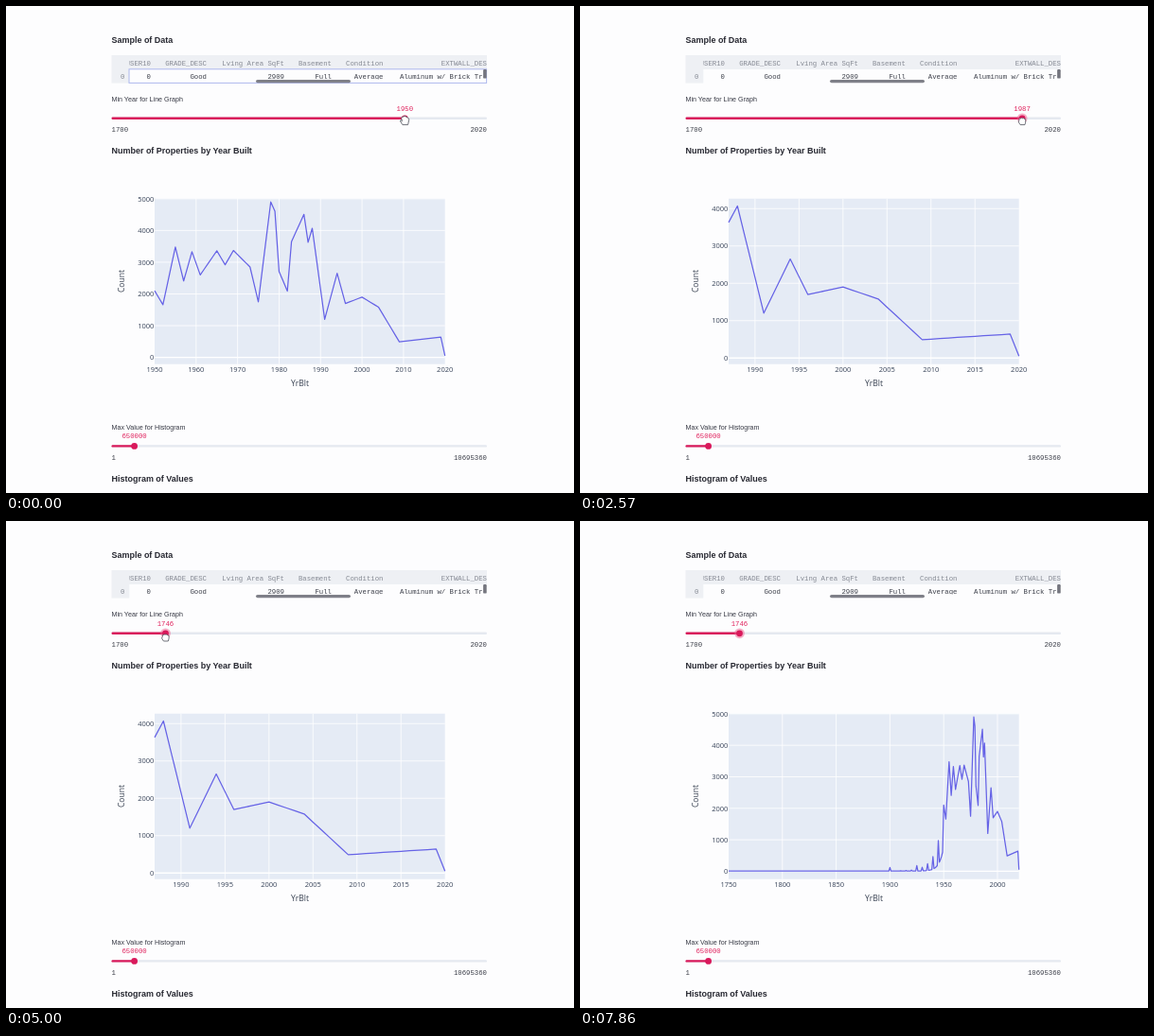
Write an HTML page that moves like this. It is 600x515 px and loops after 8 s.

```html
<!DOCTYPE html>
<html lang="en">
<head>
<meta charset="utf-8">
<title>Property data dashboard</title>
<style>
  html, body { margin: 0; width: 100%; height: 100%; overflow: hidden; background: #fdfdfe; }
  svg { display: block; width: 100%; height: 100%; }
  .head { font: bold 8.97px "Liberation Sans", Arial, sans-serif; fill: #262730; }
  .label { font: 7.15px "Liberation Sans", Arial, sans-serif; fill: #363843; }
  .mono { font: 7.3px "Liberation Mono", "Courier New", monospace; fill: #3c3f49; white-space: pre; }
  .dim { fill: #858993; }
  .value { fill: #e0245e; }
  .tick { font: 7.5px "Open Sans", "DejaVu Sans", sans-serif; fill: #364257; }
  .axis { font: 8.6px "Open Sans", "DejaVu Sans", sans-serif; fill: #3d4656; }
  .grid { stroke: #fff; stroke-width: .8; }
  .zero { stroke: #fff; stroke-width: 1.4; }
  .line { fill: none; stroke: #6663e6; stroke-width: 1.25; stroke-linejoin: round; }
  .cursor { fill: #fff; stroke: #4c4e58; stroke-width: .8; stroke-linejoin: round; }
</style>
</head>
<body>
<svg id="stage" viewBox="0 0 600 515" preserveAspectRatio="none"></svg>
<script>
const NS = "http://www.w3.org/2000/svg";
const stage = document.getElementById("stage");

function add(parent, tag, attrs = {}, text) {
  const node = document.createElementNS(NS, tag);
  for (const key in attrs) node.setAttribute(key, attrs[key]);
  if (text !== undefined) node.textContent = text;
  parent.appendChild(node);
  return node;
}
const write = (parent, cls, x, y, text, anchor = "start") =>
  add(parent, "text", { class: cls, x, y, "text-anchor": anchor }, text);
const rect = (parent, x, y, width, height, fill, rx = 0) =>
  add(parent, "rect", { x, y, width, height, fill, rx });
const show = (node, on) => node.setAttribute("display", on ? "inline" : "none");

const LEFT = 111.5, RIGHT = 508, PINK = "#d9195b";
rect(stage, 0, 0, 600, 515, "#fdfdfe");
const upper = add(stage, "g");
const lower = add(stage, "g"); // everything that goes stale during a rerun

write(upper, "head", LEFT, 39, "Sample of Data");
write(upper, "head", LEFT, 156, "Number of Properties by Year Built");
write(lower, "head", LEFT, 502.5, "Histogram of Values");

// Table
rect(upper, LEFT, 52, RIGHT - LEFT, 15, "#eef0f4");
rect(upper, LEFT, 67, 18.8, 14.5, "#eef0f4");
write(upper, "mono dim", 125.5, 76.6, "0", "end");
rect(add(stage, "clipPath", { id: "cells" }), 130.3, 52, RIGHT - 130.3, 25.4);
const cells = add(upper, "g", { "clip-path": "url(#cells)" });
function column(x, title, value, anchor = "end") {
  write(cells, "mono dim", x, 62.6, title, anchor);
  write(cells, "mono", x, 76.6, value, anchor);
}
column(153, "USER10", "0");
column(212, "GRADE_DESC", "Good");
column(294, "Lving Area SqFt", "2909");
column(344, "Basement", "Full");
column(398.5, "Condition", "Average");
column(416, " ".repeat(10) + "EXTWALL_DESC", "Aluminum w/ Brick Tr", "start");
const focusBox = add(upper, "rect", {
  x: 130, y: 66.8, width: 377.6, height: 14.6, fill: "none", stroke: "#aeb9ee"
});
rect(upper, 264, 77.9, 100, 3.4, "#7f8088", 1.7);
rect(upper, 504.1, 67, 3.6, 9.6, "#75767f", 1.2);

// Sliders
const trackX = (value, min, max) => LEFT + (RIGHT - LEFT) * (value - min) / (max - min);
function makeSlider(parent, y, title, min, max) {
  write(parent, "label", LEFT, y - 17.4, title);
  write(parent, "mono", LEFT, y + 14.3, min);
  write(parent, "mono", RIGHT, y + 14.3, max, "end");
  rect(parent, LEFT, y - 1.2, RIGHT - LEFT, 2.4, "#e5e9f0", 1.2);
  const bar = rect(parent, LEFT, y - 1.2, 0, 2.4, PINK, 1.2);
  const halo = add(parent, "circle", { cy: y, r: 5.4, fill: "#f0628f", opacity: .5 });
  const thumb = add(parent, "circle", { cy: y, r: 3.4, fill: PINK });
  const text = write(parent, "mono value", 0, y - 8, "", "middle");
  return function set(value, focused) {
    const x = trackX(value, min, max);
    bar.setAttribute("width", x - LEFT);
    halo.setAttribute("cx", x);
    thumb.setAttribute("cx", x);
    text.setAttribute("x", x);
    text.textContent = Math.round(value);
    show(halo, focused);
  };
}
const setYear = makeSlider(upper, 118.8, "Min Year for Line Graph", 1700, 2020);
makeSlider(lower, 465.4, "Max Value for Histogram", 1, 10695360)(650000, false);

// Key points: [time or year, value], joined by straight or eased pieces
function along(keys, at, ease = p => p) {
  if (at <= keys[0][0]) return keys[0][1];
  const i = keys.findIndex(key => key[0] > at);
  if (i < 0) return keys[keys.length - 1][1];
  const [a, from] = keys[i - 1], [b, to] = keys[i];
  return from + (to - from) * ease((at - a) / (b - a));
}
const smooth = p => p * p * (3 - 2 * p);

// Yearly counts: turning points after 1950, exponential growth with round-year spikes before
const turns = [
  [1950, 2100], [1952, 1660], [1955, 3480], [1957, 2410], [1959, 3330], [1961, 2600],
  [1965, 3360], [1967, 2920], [1969, 3370], [1973, 2850], [1975, 1750], [1978, 4900],
  [1979, 4610], [1980, 2710], [1982, 2090], [1983, 3650], [1986, 4510], [1987, 3630],
  [1988, 4070], [1991, 1200], [1994, 2650], [1996, 1700], [2000, 1900], [2004, 1580],
  [2009, 490], [2019, 640], [2020, 50]
];
function count(year) {
  if (year >= 1950) return along(turns, year);
  let n = 6 + 600 * Math.exp((year - 1949) / 4);
  if (year >= 1900 && year % 5 === 0) n += 400 * Math.exp((year - 1940) / 8);
  if (year >= 1900 && year % 25 === 0) n += 110;
  return n;
}

// Line charts
const PLOT = { x: 157, y: 203.7, w: 306.7, h: 175 };
function makeChart(from, firstTick, tickStep, top, zeroY, perThousand) {
  const g = add(lower, "g");
  const px = year => PLOT.x + PLOT.w * (year - from) / (2020 - from);
  const py = n => zeroY - n * perThousand / 1000;
  rect(g, PLOT.x, PLOT.y, PLOT.w, PLOT.h, "#e5ebf5");
  for (let year = firstTick; year <= 2020; year += tickStep) {
    const x = px(year);
    if (year > from && year < 2020)
      add(g, "line", { class: "grid", x1: x, x2: x, y1: PLOT.y, y2: PLOT.y + PLOT.h });
    write(g, "tick", x, 387, year, "middle");
  }
  for (let n = 0; n <= top; n += 1000) {
    const y = py(n);
    add(g, "line", { class: n ? "grid" : "zero", x1: PLOT.x, x2: PLOT.x + PLOT.w, y1: y, y2: y });
    write(g, "tick", 156.3, y + 2.7, n, "end");
  }
  const points = [];
  for (let year = from; year <= 2020; year++) points.push(px(year) + "," + py(count(year)));
  add(g, "polyline", { class: "line", points: points.join(" ") });
  return g;
}
const charts = [
  makeChart(1950, 1950, 10, 5000, 371.6, 33.55),
  makeChart(1987, 1990, 5, 4000, 372.2, 39.48),
  makeChart(1750, 1750, 50, 5000, 370.4, 33.3)
];
write(lower, "axis", 310.5, 402, "YrBlt", "middle");
add(lower, "text", { class: "axis", "text-anchor": "middle", transform: "translate(125.3 291) rotate(-90)" }, "Count");

// Cursors
const cursor = add(stage, "g", { class: "cursor" });
const arrow = add(cursor, "path", { d: "M0 0V9L2.1 7.1 3.6 10.2 5 9.5 3.6 6.6H6.3Z" });
const openHand = add(cursor, "path", {
  d: "M-2.4 5L-4.6 1.4Q-5.2 .1-4 .2L-2.9 1.2-3.6-2.4Q-3.2-3.6-2.2-2.8-1.7-4.8-.4-3.8 .9-4.9 1.5-3.1 3-3.8 3.3-2 4.8-2 4.4 0L3.3 5Z"
});
const fist = add(cursor, "path", {
  d: "M-2 5L-3.6 2.6Q-4.3 .6-3.1 .4V-1Q-2.7-2.4-1.5-1.7-.5-2.8 .4-1.8 1.6-2.6 2.2-1.3 3.7-1.4 3.7 .4 3.7 2.6 2.8 5Z"
});

// Motion: two drags, then the pointer leaves for the left margin
const yearKeys = [[140, 1950], [1000, 1987], [2700, 1987], [3571, 1865], [4560, 1746]];
const heightKeys = [[2700, 120.6], [3571, 129.6], [4560, 122], [5000, 122], [5850, 206]];
const leaveKeys = [[5000, 0], [5850, -80.5]];
const driftKeys = [[2700, 0], [3571, -5.4], [4560, 0]];

// A second after each release the stale part starts fading, until new data arrives
const RELEASES = [1000, 5000], WAIT = 1420, DELAY = 500;
function staleOpacity(t) {
  const since = Math.min(...RELEASES.map(r => t - r).filter(d => d >= 0));
  return since > DELAY && since < WAIT ? 1 - .67 * ((since - DELAY) / 1000) ** 2 : 1;
}

const LOOP = 8000, STEP = 1000 / 7; // seven pictures a second
function draw(time) {
  const t = Math.floor((time % LOOP + 5) / STEP) * STEP;
  const pressed = t > 140;
  const year = along(yearKeys, t, smooth);
  setYear(year, pressed);
  show(focusBox, !pressed);
  lower.setAttribute("opacity", staleOpacity(t));
  const current = RELEASES.filter(r => t >= r + WAIT).length;
  charts.forEach((chart, i) => show(chart, i === current));

  const x = trackX(year, 1700, 2020) + along(driftKeys, t, smooth) + along(leaveKeys, t, smooth);
  const y = along(heightKeys, t, smooth);
  const off = y > 126;
  cursor.setAttribute("transform", `translate(${x} ${y})`);
  show(arrow, off);
  show(openHand, !off && !pressed);
  show(fist, !off && pressed);
  show(cursor, t < 7850);
}

const begin = performance.now();
function tick() {
  draw(performance.now() - begin);
  requestAnimationFrame(tick);
}
tick();
</script>
</body>
</html>
```
